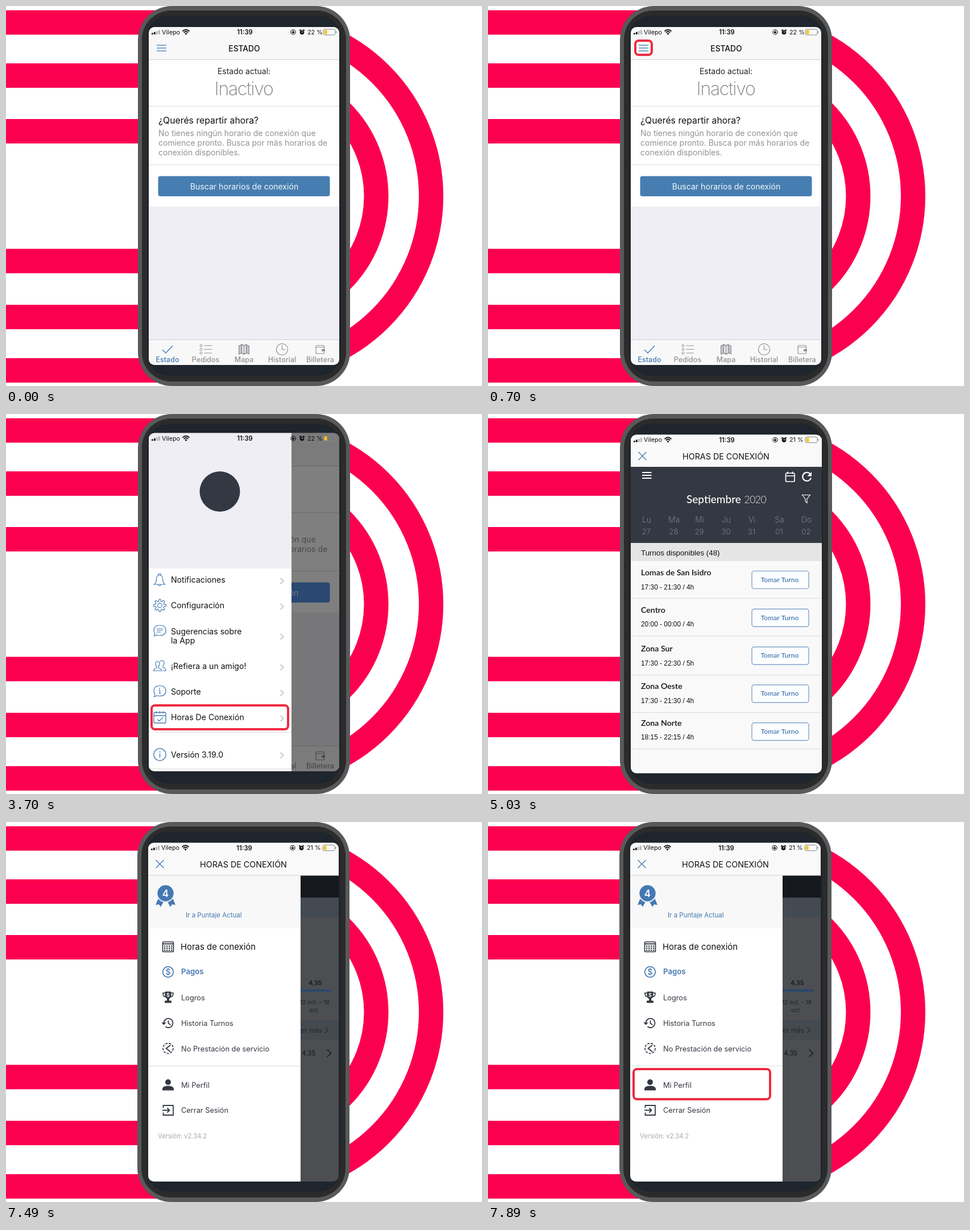
Write an HTML page with a canvas that moves like this. It is 837 by 669 pixels and loops after 8000 ms.

```html
<!DOCTYPE html>
<html lang="es">
<head>
<meta charset="utf-8">
<title>Horas de conexión</title>
<style>
html, body { margin: 0; width: 100%; height: 100%; overflow: hidden; background: #fff; }
canvas { display: block; }
</style>
</head>
<body>
<canvas id="stage" width="837" height="669"></canvas>
<script>
const ctx = document.getElementById('stage').getContext('2d');
const LOOP = 8000;
const PINK = '#fc0050', RED = '#ee2b40', BLUE = '#4579b3', NAVY = '#343842';
const GREY = '#929297', RULE = '#dcdcdf', INK = '#111', PALE = '#efeef4';
const SANS = 'Inter, sans-serif', LATO = 'Lato, sans-serif';
const ARIAL = '"Liberation Sans", Arial, sans-serif';

function rect(x, y, w, h, color) {
  ctx.fillStyle = color;
  ctx.fillRect(x, y, w, h);
}

function paint(path, fill, stroke, width = 1.2) {
  if (fill) { ctx.fillStyle = fill; ctx.fill(path); }
  if (stroke) { ctx.strokeStyle = stroke; ctx.lineWidth = width; ctx.stroke(path); }
}

function round(x, y, w, h, r, fill, stroke, width) {
  const p = new Path2D();
  p.roundRect(x, y, w, h, r);
  paint(p, fill, stroke, width);
}

function circle(x, y, r, fill, stroke, width) {
  const p = new Path2D();
  p.arc(x, y, r, 0, Math.PI * 2);
  paint(p, fill, stroke, width);
}

const draw = (d, stroke, width, fill) => paint(new Path2D(d), fill, stroke, width);

// y is the middle of the capital letters
function text(str, x, y, size, color = INK, { weight = 400, font = SANS, align = 'left', spacing = 0 } = {}) {
  ctx.font = `${weight} ${size}px ${font}`;
  ctx.letterSpacing = spacing + 'px';
  ctx.textAlign = align;
  ctx.fillStyle = color;
  ctx.fillText(str, x, y + size * 0.36);
}

const centered = (str, x, y, size, color, style) => text(str, x, y, size, color, { ...style, align: 'center' });

const chevron = (x, y, color = '#b9b9be', width = 1.4) => draw(`M${x} ${y - 5}l5.5 5-5.5 5`, color, width);

const highlight = (x, y, w, h) => round(x + 2, y + 2, w - 4, h - 4, 6, null, RED, 4);

function hamburger(x, y, w, color, width) {
  for (const dy of [-5, 0, 5]) draw(`M${x} ${y + dy}h${w}`, color, width);
}

function ring(x, outer) {
  circle(x, 334.8, outer - 21.5, null, PINK, 43);
}

function backdrop() {
  rect(0, 0, 837, 669, '#fff');
  ctx.save();
  ctx.beginPath();
  ctx.rect(500, 0, 337, 669);
  ctx.clip();
  ring(443.5, 325.5);
  ring(440, 232.5);
  ctx.restore();
  for (const y of [7.5, 101, 199, 427.5, 526, 620]) rect(0, y, 300, 43, PINK);
}

// Phone body; content is drawn clipped to the display
function phone(top, bottom, right, content) {
  round(232, 0, 373, 669, 60, '#58595a');
  round(239, 8, 359, 653, 51, '#2b2b2c');
  round(248, 17, 341, 634, 38, '#1f252c');
  ctx.save();
  const screen = new Path2D();
  screen.roundRect(251, top, right - 251, bottom - top, 10);
  ctx.clip(screen);
  content();
  ctx.restore();
}

function statusBar(y, charge) {
  for (let i = 0; i < 4; i++) rect(256 + i * 4, y + 1.5 - i * 1.7, 2.8, 2.5 + i * 1.7, i < 2 ? INK : '#b5b5b8');
  text('Vilepo', 274, y, 10.8);
  ctx.lineCap = 'butt';
  draw(`M310.5 ${y - 1.5}q6-5.5 12 0M312.7 ${y + .9}q3.8-3.6 7.6 0`, INK, 1.9);
  draw(`M314.4 ${y + 2.6}q2.1-2 4.2 0l-2.1 2.3z`, null, 1, INK);
  centered('11:39', 420, y, 11.2, INK, { weight: 600 });
  circle(505, y, 4.2, null, INK, 1.1);
  rect(503, y - .7, 4, 2.8, INK);
  circle(505, y - .9, 1.3, null, INK, .9);
  circle(520.5, y + .4, 3.8, INK);
  draw(`M516 ${y - 2.6}l2.5-2M525 ${y - 2.6}l-2.5-2`, INK, 1.5);
  draw(`M520.5 ${y - 1.6}v2.2l2-1`, '#fff', .8);
  text(charge + ' %', 530, y, 10.8);
  round(558, y - 5, 21, 10, 2.5, null, '#88888b', 1);
  round(559.5, y - 3.5, 5, 7, 1, '#fcc419');
  rect(580, y - 1.5, 1.3, 3, '#88888b');
}

function tabBar() {
  rect(251, 587, 336, 50, '#f8f8f8');
  rect(251, 587, 336, 1, '#cfcfd2');
  draw('M275 605l6 6 12-13', BLUE, 1.4);
  for (const y of [598, 604.5, 611]) {
    circle(343, y, 2, null, GREY, 1);
    draw(`M348.5 ${y}h13.5`, GREY, 1.2);
  }
  draw('M409.5 598l5-2v15l-5 2zM422.5 596.5l5 2v14l-5-2z', GREY, 1.2, '#c4c4c8');
  draw('M414.5 596l4 2 4-2v15l-4 2-4-2zM418.5 598v15', GREY, 1.6);
  circle(485.5, 604.5, 10, null, GREY, 1.2);
  draw('M485.5 597.5v7.5h6', GREY, 1.2);
  round(545, 597.5, 14.5, 14.5, 2, null, GREY, 1.2);
  draw('M545 600.5h14.5', GREY, 1.2);
  round(555, 604, 6, 4, 1, GREY);
  const tabs = { Estado: 284, Pedidos: 351, Mapa: 418.5, Historial: 485.5, Billetera: 552.5 };
  for (const [name, x] of Object.entries(tabs))
    centered(name, x, 623, 12.4, name === 'Estado' ? BLUE : GREY, { weight: 500, spacing: .1 });
}

function homePage(buttonColor) {
  rect(251, 30, 336, 65, '#f8f8f8');
  rect(251, 94, 336, 1, '#cfcfd2');
  hamburger(265, 74, 17, '#5a8cc2', 1.3);
  centered('ESTADO', 419, 75, 13.8, INK, { weight: 500 });
  rect(251, 95, 336, 258, '#fff');
  centered('Estado actual:', 418.5, 114.5, 14, '#222');
  centered('Inactivo', 418, 145.5, 32, '#808084', { weight: 200, spacing: -1.3 });
  rect(251, 176, 336, 1, RULE);
  text('¿Querés repartir ahora?', 268, 201, 15.8);
  text('No tienes ningún horario de conexión que', 268, 223.5, 14, GREY);
  text('comience pronto. Busca por más horarios de', 268, 241, 14, GREY);
  text('conexión disponibles.', 268, 258, 14, GREY);
  rect(251, 279, 336, 1, RULE);
  round(267.5, 299.5, 302, 35.5, 4, buttonColor);
  centered('Buscar horarios de conexión', 419, 317.5, 14.1, '#f4f8fc');
  rect(251, 353, 336, 235, PALE);
  tabBar();
}

function homeScreen() {
  phone(37, 632, 586, () => {
    homePage('#477eb1');
    statusBar(46, 22);
  });
}

function gear(x, y) {
  const p = new Path2D();
  for (let i = 0; i <= 96; i++) {
    const a = i / 96 * Math.PI * 2;
    const r = 9.2 + 1.7 * Math.tanh(3 * Math.cos(8 * a));
    p.lineTo(x + r * Math.cos(a), y + r * Math.sin(a));
  }
  paint(p, null, BLUE, 1.2);
  circle(x, y, 3.8, null, BLUE, 1.2);
}

function drawerIcons() {
  draw('M260.5 300q4-3 4-9.500q0-7 5.500-7t5.500 7q0 6.500 4 9.500zM268 283.500v-2h4v2M267.500 300.500q2.500 4 5 0', BLUE, 1.2);
  gear(270.5, 337);
  draw('M260 381q0-9 10.500-9t10.500 9-10.500 9q-3 0-5-1l-5 2 1.500-4.500q-2-2-2-5.500zM265 378h11M265 381h11M265 384h7', BLUE, 1.2);
  draw('M259.500 452q0-4 5.500-5v-2q-2-2-2-5.500 0-4 3.500-4t3.500 4q0 3.500-2 5.500v2q5.500 1 5.500 5zM271 436q1-2 3.500-2 3.500 0 3.500 4.500 0 3-2 5v2.500q5 1 5 6h-5.500', BLUE, 1.2);
  draw('M260 487.500q0-9 10.500-9t10.500 9-10.500 9q-2.500 0-4.500-.8l-5.500 2 1.500-4.700q-2-2-2-5.500zM268.500 486h2v6M268.500 492h4', BLUE, 1.2);
  circle(270, 483, 1, BLUE);
  round(260, 525.500, 21, 18.500, 1, null, BLUE, 1.3);
  draw('M260 531h21M264.500 523v4.500M270.500 523v4.500M276.500 523v4.500M266 537.500l3.500 3 6.500-6.500', BLUE, 1.3);
  circle(270.5, 599.5, 10.7, null, BLUE, 1.3);
  draw('M270.500 598v7', BLUE, 1.4);
  circle(270.5, 595, 1, BLUE);
}

function drawerScreen() {
  phone(33.5, 629, 586, () => {
    ctx.save();
    ctx.translate(0, -3);
    homePage('#5492e6');
    ctx.restore();
    rect(251, 30, 336, 605, 'rgba(0,0,0,.5)');
    rect(251, 30, 251, 242, PALE);
    rect(251, 272, 251, 360, '#fff');
    circle(376, 136.5, 35.5, NAVY);
    const items = [['Notificaciones', 292, 294], ['Configuración', 337, 339], ['Sugerencias sobre', 383, 392],
      ['¡Refiera a un amigo!', 443.5, 446], ['Soporte', 489, 491], ['Horas De Conexión', 534, 536], ['Versión 3.19.0', 600, 601]];
    for (const [label, y, arrowY] of items) {
      text(label, 290, y, 14.1);
      chevron(482.5, arrowY);
    }
    text('la App', 290, 399, 14.1);
    drawerIcons();
    rect(264, 560, 238, 1, RULE);
    rect(251, 624, 251, 1, RULE);
    statusBar(43, 22);
  });
}

function pageHeader() {
  rect(251, 36, 336, 58, '#f9f9f9');
  statusBar(45.5, 21);
  draw('M264.500 67l14 14M278.500 67l-14 14', BLUE, 1.4);
  centered('HORAS DE CONEXIÓN', 418.5, 74.5, 14.3);
}

function toolbarIcons() {
  hamburger(271, 108, 16.5, '#fff', 2);
  round(523.5, 104, 15.5, 15, 2, null, '#fff', 1.7);
  draw('M523.500 109h15.500M527 101.500v4M535.500 101.500v4', '#fff', 1.7);
  draw('M566.500 105.500a7.500 7.500 0 1 0 1.500 7', '#fff', 2.2);
  draw('M569 102v7.500h-7.500z', null, 1, '#fff');
  draw('M552.500 142.500h14l-5.500 7v7l-3-2.500v-4.500z', '#fff', 1.1);
}

function shiftsScreen() {
  phone(36.5, 632.5, 587, () => {
    rect(251, 36, 336, 600, '#f9f9f9');
    pageHeader();
    rect(251, 93, 336, 134, NAVY);
    toolbarIcons();
    text('Septiembre', 349, 150, 19, '#fff', { weight: 500, font: LATO });
    text('2020', 450.5, 150.5, 17.5, '#eee', { weight: 300, font: LATO, spacing: -.5 });
    const days = [['Lu', '27', 279], ['Ma', '28', 327], ['Mi', '29', 372], ['Ju', '30', 419],
      ['Vi', '31', 464], ['Sa', '01', 512.5], ['Do', '02', 560]];
    for (const [day, date, x] of days) {
      centered(day, x, 186, 13.8, '#7b7f87', { weight: 300 });
      centered(date, x - .5, 207.5, 13.3, '#7b7f87', { weight: 300 });
    }
    rect(251, 227, 336, 32, '#e6e5e6');
    text('Turnos disponibles (48)', 269, 244, 13.3, INK, { font: ARIAL });
    const shifts = [['Lomas de San Isidro', '17:30 - 21:30 / 4h', 279, 324], ['Centro', '20:00 - 00:00 / 4h', 344.5, 390],
      ['Zona Sur', '17:30 - 22:30 / 5h', 413, 459], ['Zona Oeste', '17:30 - 21:30 / 4h', 479, 525],
      ['Zona Norte', '18:15 - 22:15 / 4h', 543.5, 589]];
    shifts.forEach(([zone, hours, y, ruleY], i) => {
      text(zone, 269, y, 14.2, INK, { weight: 600, font: LATO });
      text(hours, 269, y + 25.5, 11.9, INK, { font: ARIAL });
      const top = 276 + i * 66.8;
      round(464, top + .5, 100, 31, 4, '#fcfdff', '#6d94c4', 1.2);
      centered('Tomar Turno', 513, top + 15.5, 12, BLUE, { weight: 600, font: LATO });
      rect(251, ruleY, 336, 1, RULE);
    });
  });
}

function profileBackdrop() {
  rect(519, 94, 68, 545, '#4c4e52');
  rect(519, 94, 68, 39, '#15181d');
  rect(519, 133, 68, 35, '#434a52');
  rect(519, 349, 68, 35, '#434a50');
  text('4,35', 533, 283, 10.8, '#17191d', { weight: 600 });
  rect(519, 294.5, 54, 4, '#29476d');
  centered('12 oct. – 18', 544, 317, 10, '#1e2125');
  centered('oct.', 543, 331, 10, '#1e2125');
  text('er más', 519, 366.5, 11.8, '#25292e');
  chevron(562, 366.5, '#25292e', 1.1);
  text('4,35', 521, 407, 11.6, '#15171a');
  draw('M565.500 400.500l7 6.500-7 6.500', '#15171a', 1.4);
}

function profileIcons() {
  round(276.5, 211, 19, 17.5, 2, null, NAVY, 1.7);
  draw('M276.500 214.500h19', NAVY, 2);
  for (let i = 0; i < 12; i++) rect(279 + i % 4 * 4, 217.5 + (i >> 2) * 3.6, 2.4, 2.2, NAVY);
  circle(286, 264, 9.3, null, BLUE, 1.7);
  centered('$', 286, 264, 14, BLUE, { weight: 500 });
  draw('M281 299h10v7q-1 4-3.500 5v4h4v3h-11v-3h4v-4q-2.500-1-3.500-5z', NAVY, 1, NAVY);
  draw('M281 301h-4q0 7 5 7M291 301h4q0 7-5 7', NAVY, 1.7);
  centered('$', 286, 304.5, 9, '#fff', { weight: 600 });
  draw('M278.500 354a8 8 0 1 1 3 6.200M286.500 349.500v5l4 2.500', NAVY, 1.8);
  draw('M274.500 353h8l-4 4.500z', null, 1, NAVY);
  ctx.setLineDash([4, 2.2]);
  circle(286, 398.5, 9, null, NAVY, 1.7);
  ctx.setLineDash([]);
  draw('M290 393l-7.500 5.500 7.500 6', NAVY, 1.8);
  circle(286, 458, 5, NAVY);
  draw('M276 472.500v-3q1-5 10-5t10 5v3z', null, 1, NAVY);
  draw('M277.500 503.500v-4.500h17.500v17h-17.500v-4.500M276 507.500h12M284.500 503.500l4 4-4 4', NAVY, 1.8);
}

function profileScreen() {
  ctx.save();
  ctx.translate(-1, 0);
  phone(36.5, 633, 586, () => {
    pageHeader();
    rect(251, 94, 268, 545, '#fff');
    rect(251, 94, 268, 93, '#f8f8f8');
    profileBackdrop();
    rect(251, 93.5, 336, 1, '#d4d4d6');
    draw('M269 134l-5 12 6-1 3 4.500 6-11zM294 134l5 12-6-1-3 4.500-6-11z', null, 1, BLUE);
    circle(281.5, 125.5, 16, '#f8f8f8');
    circle(281.5, 125.5, 14.2, BLUE);
    centered('4', 281.5, 125.5, 17, '#fff', { weight: 600 });
    text('Ir a Puntaje Actual', 317, 163.5, 11.5, BLUE);
    profileIcons();
    text('Horas de conexión', 308, 220, 14.9);
    text('Pagos', 309, 263.5, 13.2, BLUE, { weight: 600 });
    const items = { 'Logros': 309, 'Historia Turnos': 354, 'No Prestación de servicio': 399, 'Mi Perfil': 463, 'Cerrar Sesión': 507.5 };
    for (const [label, y] of Object.entries(items)) text(label, 309, y, 12.8, NAVY);
    rect(251, 429, 268, 1, RULE);
    text('Versión: v2.34.2', 268, 553, 11.2, '#a9a9ae');
  });
  ctx.restore();
}

// Each scene: end time, screen, time its highlight appears, highlight box
const scenes = [
  [2970, homeScreen, 700, [257, 59, 33, 29]],
  [5030, drawerScreen, 3700, [254, 511, 244, 46]],
  [7490, shiftsScreen, 5660, [263, 93, 33, 28.5]],
  [LOOP, profileScreen, 7890, [254, 433, 244, 57]],
];

function frame() {
  const t = performance.now() % LOOP;
  const [, screen, markAt, box] = scenes.find(([end]) => t < end);
  backdrop();
  screen();
  if (t >= markAt) highlight(...box);
  requestAnimationFrame(frame);
}
frame();
</script>
</body>
</html>
```
